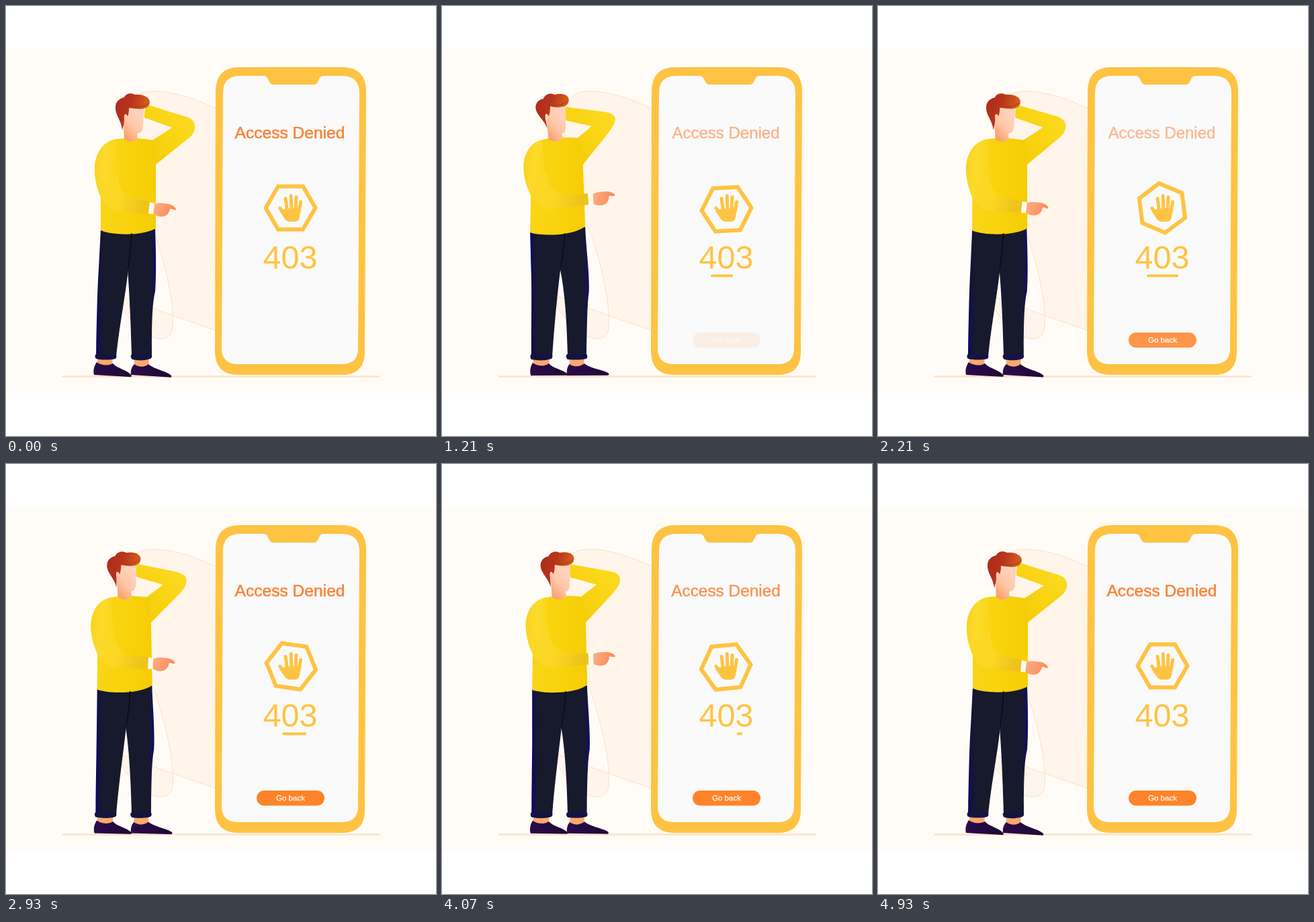
An HTML page that plays this animation: 640 px wide and 640 px high, repeating every 5000 ms.

```html
<!DOCTYPE html>
<html lang="en">
<head>
<meta charset="utf-8">
<title>Access Denied</title>
<style>
html, body { margin: 0; width: 100%; height: 100%; overflow: hidden; background: #fff; }
svg { display: block; width: 100vw; height: 100vh; }
text { font-family: "Liberation Sans", Arial, sans-serif; text-anchor: middle; }
</style>
</head>
<body>
<svg viewBox="0 0 640 640">
  <defs>
    <linearGradient id="hairG" x2="1" y2="0.3">
      <stop offset="0" stop-color="#a92a1c"/><stop offset=".5" stop-color="#b8351b"/><stop offset="1" stop-color="#d8631c"/>
    </linearGradient>
    <linearGradient id="skinG" x1=".7" y1=".2" x2=".2" y2="1">
      <stop offset="0" stop-color="#ffd2bb"/><stop offset=".45" stop-color="#fec7a9"/><stop offset="1" stop-color="#f99c66"/>
    </linearGradient>
    <linearGradient id="handG" x2="1" y2="0.3">
      <stop offset="0" stop-color="#fdb085"/><stop offset="1" stop-color="#fb8a5c"/>
    </linearGradient>
    <linearGradient id="shirtG" x2="1" y2="0">
      <stop offset="0" stop-color="#f9d51b"/><stop offset=".5" stop-color="#f9d30d"/><stop offset="1" stop-color="#f5cd05"/>
    </linearGradient>
    <linearGradient id="sleeveG" x2="1" y2="0.15">
      <stop offset="0" stop-color="#f8d21c"/><stop offset=".45" stop-color="#fddb2c"/><stop offset="1" stop-color="#f9d312"/>
    </linearGradient>
    <linearGradient id="foreG" x2="1" y2="0.25">
      <stop offset="0" stop-color="#fcd92a"/><stop offset=".55" stop-color="#fbd723"/><stop offset="1" stop-color="#edc41b"/>
    </linearGradient>
    <linearGradient id="armG" x1="0" y1="1" x2="1" y2="0">
      <stop offset="0" stop-color="#f2ca08"/><stop offset=".45" stop-color="#f8d311"/><stop offset="1" stop-color="#fcdc25"/>
    </linearGradient>
    <linearGradient id="legL" x2="1" y2="0">
      <stop offset="0" stop-color="#09007d"/><stop offset=".09" stop-color="#13143a"/><stop offset=".2" stop-color="#17192d"/>
    </linearGradient>
    <linearGradient id="legR" x2="1" y2="0">
      <stop offset=".78" stop-color="#17192d"/><stop offset=".93" stop-color="#151545"/><stop offset="1" stop-color="#0d0680"/>
    </linearGradient>
    <linearGradient id="shoeG" x2="1" y2="0">
      <stop offset="0" stop-color="#2c0a4c"/><stop offset="1" stop-color="#1c0a33"/>
    </linearGradient>
  </defs>

  <rect y="64" width="640" height="512" fill="#fffcf7"/>
  <path fill="#fff5ea" stroke="#fddfc6" d="M325 159C280 135 228 120 200 130C165 150 185 260 222 341C238 388 251 445 248 480C245 499 228 498 212 490C185 472 160 440 175 433C200 443 255 464 325 487Z"/>
  <path d="M85 551.5H555" stroke="#ffe1c6" stroke-width="2.6" stroke-linecap="round"/>

  <path fill="#ffc343" d="M348 91H500Q536 91 536 127L534 515Q534 549 500 549H346Q311 549 311 514L312 127Q312 91 348 91Z"/>
  <path fill="#fafafa" d="M347 104H383Q388 104 390 109L392 113Q394 117 398 117H458Q462 117 464 113L466 109Q468 104 473 104H501Q526 105 526 130L524 509Q524 533 500 533H345Q321 533 321 509L323 129Q323 105 347 104Z"/>

  <g id="man"></g>

  <g id="title"><text x="422.5" y="197" font-size="24.6" fill="#fb8136" stroke="#fb8136" stroke-width=".55">Access Denied</text></g>
  <polygon id="hex" fill="none" stroke="#ffc343" stroke-width="6"/>
  <g fill="#ffc343" stroke="#ffc343" stroke-width="5" stroke-linecap="round">
    <path d="M416 286.500L418.500 304M424.200 282.500L425 304M432 284.500L431 304M438.500 291.500L436 307M407.800 301L417 312" fill="none"/>
    <path stroke="none" d="M416 302L438.300 300L437 314Q436 321 430 321H423Q418 321 415 317L407 305Z"/>
  </g>
  <text x="423" y="391" font-size="48.500" fill="#ffc343">403</text>
  <path id="line" stroke="#ffc343" stroke-width="4" stroke-linecap="round"/>
  <g id="button">
    <rect x="373" y="486" width="101" height="22.500" rx="11.250" fill="#ff8429"/>
    <text x="423.500" y="501" font-size="11.500" fill="#fff" stroke="#fff" stroke-width=".25">Go back</text>
  </g>
</svg>
<script>
const LOOP = 5000, ACTIVE = 4930, SWAY = ACTIVE / 2, PULSE = ACTIVE / 5, LEFT = 1060;
const $ = id => document.getElementById(id);
const clamp = v => Math.max(0, Math.min(1, v));
const ramp = (t, a, b) => clamp((t - a) / (b - a));
const wave = x => (1 - Math.cos(Math.PI * x)) / 2;
const NS = "http://www.w3.org/2000/svg";

function addPath(attrs) {
  const el = document.createElementNS(NS, "path");
  for (const k in attrs) el.setAttribute(k, attrs[k]);
  $("man").appendChild(el);
  return el;
}

// Blend two paths with the same commands
function blend(a, b, q) {
  const nums = b.match(/-?[\d.]+/g);
  let i = 0;
  return a.replace(/-?[\d.]+/g, v => (+v + (nums[i++] - v) * q).toFixed(2));
}

// Each part: fill, pose leaning right, pose leaning left
const parts = [
  ["#fba86d",
   "M136 523L159 523L158 535L136 535ZM191 524L213 524L212 537L191 537Z",
   "M136 523L160 523L159 535L136 535ZM190 524L212 524L211 536L190 536Z"],
  ["url(#shoeG)",
   "M131 549C129 541 132 535 135 530C141 535 153 536 159 532C166 540 180 541 187 550C187 552 186 552 184 552Z",
   "M132 550C130 542 132 536 135 531C141 536 153 537 159 532C166 540 180 541 187 548C188 550 186 550 184 550Z"],
  ["url(#shoeG)",
   "M186 549C185 541 188 536 191 533C197 538 207 538 212 533C221 541 241 544 246 550C247 553 245 553 243 552.500Z",
   "M186 550C185 542 187 536 190 533C196 538 206 537 212 532C221 540 242 542 248 547C249 550 247 550 244 550Z"],
  ["url(#legL)",
   "M141 333L188 336L182 392C178 430 168 480 164 522L134 522C135 470 136 420 138 390Z",
   "M132 335L184 336L177 390C172 430 167 480 164 522L133 522C133 470 134 420 133 390Z"],
  ["url(#legR)",
   "M186 336L222 331C223 360 224 395 222 425C217 445 217 480 217 522L187 522C186 480 184 430 181 392Z",
   "M182 336L214 329C215 360 220 395 219 425C216 445 216 480 215 522L187 522C186 480 184 430 176 390Z"],
  ["#151343",
   "M134 518L163 518C165 520 165 523 163 525C154 527 143 527 134 525C132 523 132 520 134 518Z",
   "M133 518L163 518C165 520 165 523 163 525C154 528 143 528 133 526C131 523 131 520 133 518Z"],
  ["#151343",
   "M188 518L215 518C218 520 218 523 215 525C207 528 196 528 188 526C185 523 185 520 188 518Z",
   "M187 518L215 518C217 520 217 523 215 525C207 527 196 527 187 526C184 523 184 520 187 518Z"],
  ["url(#armG)",
   "M223 236L269 199C278 193 282 186 281 178C281 170 272 165 262 163L214 148C208 148 206 152 206 166L247 181L216 201L200 215Z",
   "M211 236L247 193C254 185 259 177 260 170C260 163 254 160 244 158L186 150C180 152 181 160 187 170L225 179L203 197L190 215Z"],
  ["url(#shirtG)",
   "M176 197L198 197C206 198 214 199 219 200C222 212 223 225 223 236L223 331C205 342 160 342 141 334L141 285C135 270 132 258 132 243C132 220 145 200 165 198Z",
   "M160 197L181 196C190 196 198 196 206 197C209 212 211 225 211 236L214 328C197 342 152 343 132 337L133 282C126 268 122.500 255 122.500 240C122.500 218 135 202 151 199Z"],
  ["url(#sleeveG)",
   "M165 198.500C145 200 132 220 132 243C132 258 137 270 141 285L172 282C167 260 169 225 165 198.500Z",
   "M150 199.500C135 202 122.500 218 122.500 240C122.500 255 128 268 133 282L165 280C156 260 152 225 150 199.500Z"],
  ["url(#skinG)",
   "M174 164L176 198C182 203 190 203 196 198L195 190C202 189 204 184 204 176L206 150L180 150Z",
   "M157 164L160 198C166 203 175 203 182 197L180 190C184 189 186 186 186 178L186 148L162 148Z"],
  ["url(#hairG)",
   "M173 185C172 170 162 162 163 150C163 142 170 137 176 136C178 130 187 129 192 132C204 131 214 136 214 143C214 151 206 154 196 153C190 153 186 151 183 152C183 158 182 162 181 164C178 158 175 161 176 168C176 176 174 180 173 185Z",
   "M158 183C155 170 141 162 141.500 150C142 142 149 138 153 138C156 130 165 129 170 132C182 129 191 133 191 140C191 149 183 151 173 151C168 151 165 149 163 150C163 157 162 161 161 164C158 158 155 160 156 167C157 174 158 178 158 183Z"]
].map(([fill, a, b]) => ({ a, b, el: addPath({ fill }) }));

const seam = addPath({ stroke: "#080912", "stroke-width": 1.2, fill: "none" });
const curl = addPath({ stroke: "#9c321b", "stroke-width": .8, fill: "none" });
const forearm = addPath({ fill: "url(#foreG)" });
const cuff = addPath({ fill: "#fffaf0", d: "M-3 -9L5 -7L2 9L-5 8Z" });
const hand = addPath({ fill: "url(#handG)", d: "M4 -6.500C10 -8 14 -8 20 -7C28 -7 36 -2 36 2C33 4 30 0 27 1C26 8 21 13 13 12.500C9 12 5 10 2.500 8.500Z" });

// Quick lean to the left, slower return
function lean(t) {
  if (t > LEFT) return 1 - wave((t - LEFT) / (SWAY - LEFT));
  const x = t / LEFT;
  return (wave(x) + Math.sin(x * Math.PI / 2)) / 2;
}

function drawMan(t) {
  const c = t % SWAY, q = lean(c) / 0.884, lift = wave(2 * c / SWAY);
  for (const p of parts) p.el.setAttribute("d", blend(p.a, p.b, q));
  seam.setAttribute("d", blend("M187 338Q186 365 181.500 392", "M183 338Q182 365 176.500 390", q));
  curl.setAttribute("d", blend("M191 150Q205 151 212 145", "M168 148Q182 148 189 142", q));

  const x = 217 - 12 * q + 18 * lift, y = 301 - 14 * lift, deg = -11 * lift;
  const r = deg * Math.PI / 180, cos = Math.cos(r), sin = Math.sin(r);
  const at = (u, v) => `${x + u * cos - v * sin} ${y + u * sin + v * cos}`;
  const top = blend("C172 278 168 268 167 250L140 262", "C165 276 158 266 156 248L130 260", q);
  const low = blend("M140 262C137 285 146 302 167 306", "M130 260C128 281 138 299 162 303", q);
  forearm.setAttribute("d", `${low}L${at(-5, 8)}L${at(-3, -9)}L${at(-36, -18 + 6 * lift)}${top}Z`);
  const place = `translate(${x} ${y}) rotate(${deg})`;
  cuff.setAttribute("transform", place);
  hand.setAttribute("transform", place);
}

function drawScreen(t) {
  const glow = 1 - wave(2 * t / PULSE), s = 0.945 + 0.055 * glow;
  $("title").setAttribute("opacity", glow);
  $("title").setAttribute("transform", `translate(422.5 189) scale(${s}) translate(-422.5 -189)`);

  const spin = t / ACTIVE * 4 * Math.PI;
  const cx = 423.5 + Math.sin(spin), cy = 301.5 - Math.cos(spin);
  const corners = [0, 1, 2, 3, 4, 5].map(i => {
    const a = spin + i * Math.PI / 3;
    return `${cx + 37 * Math.cos(a)},${cy + 37 * Math.sin(a)}`;
  });
  $("hex").setAttribute("points", corners.join(" "));

  const from = 402 + 43 * ramp(t, 2475, 4240), to = 402 + 43 * ramp(t, 60, 1760);
  $("line").setAttribute("d", to > from ? `M${from} 401.500H${to}` : "");
  $("button").setAttribute("opacity", ramp(t, 1080, 2410));
}

const start = performance.now();
function frame() {
  const t = Math.min((performance.now() - start) % LOOP, ACTIVE);
  drawMan(t);
  drawScreen(t);
  requestAnimationFrame(frame);
}
frame();
</script>
</body>
</html>
```
